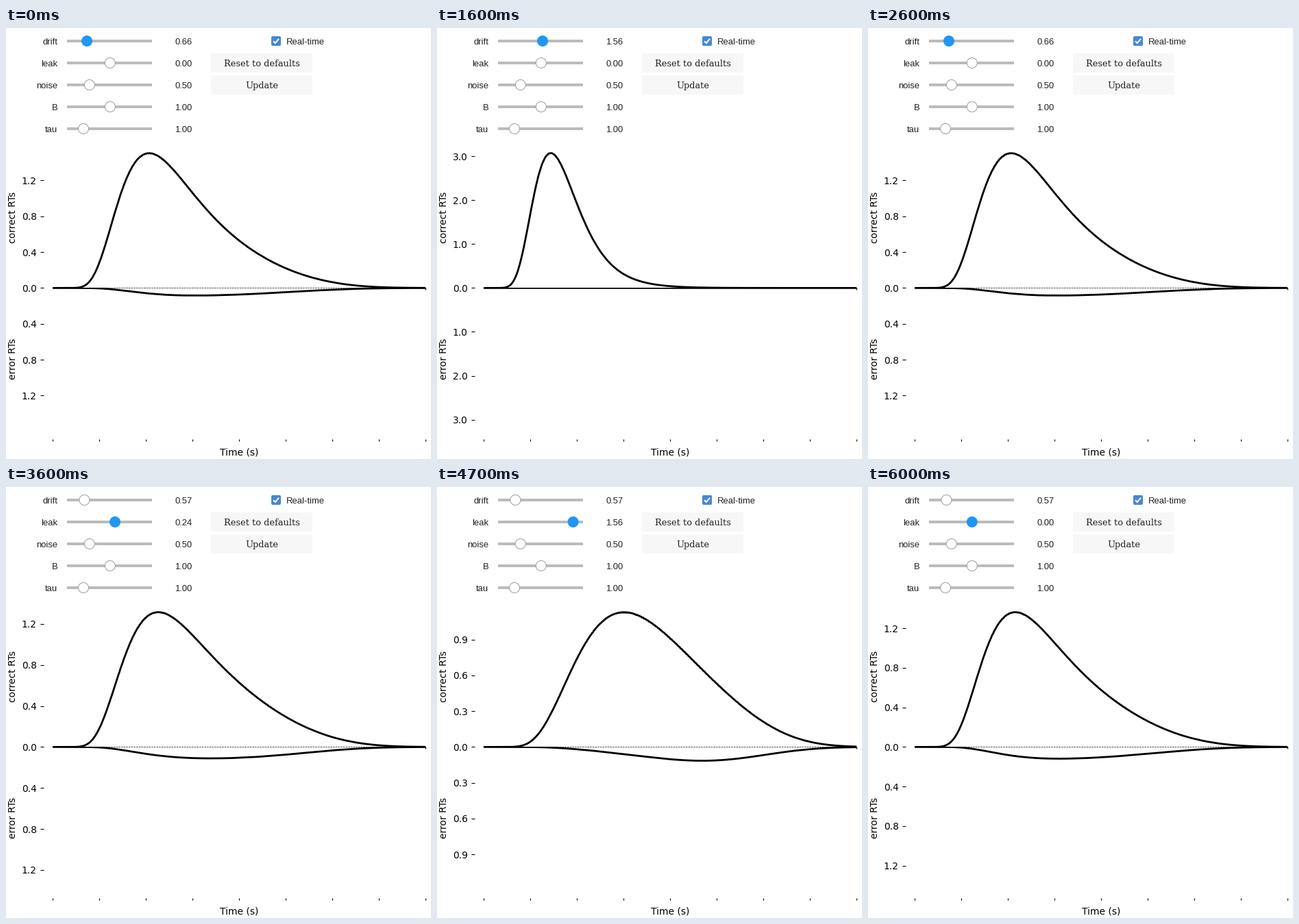
Recreate the animation shown at these times as a matplotlib script. Size 620x629 px, loop 6700 ms.

```python
import numpy as np
import matplotlib.pyplot as plt
from matplotlib.animation import FuncAnimation
from matplotlib.patches import Circle, FancyBboxPatch, Rectangle
from matplotlib.ticker import MaxNLocator

W, H, DPI = 620, 629, 100
PX = 72 / DPI  # points per pixel
FRAMES, STEP_MS = 67, 100

# Drift-diffusion model with an exponentially collapsing bound
DX = DT = 0.005
NOISE, BOUND, TAU, T_END = 0.5, 1.0, 1.0, 2.0

# Plot geometry in pixels, y pointing down
LEFT, WIDTH, ZERO, PEAK = 68.4, 544, 379.4, 196.8
HALF = 1.05 * PEAK
OFFSET = 13.9

BLUE = "#2196f3"
INK = "#212121"


def solve_tridiag(low, diag, up, rhs):
    """Thomas algorithm, run for many parameter sets at once."""
    n = len(rhs)
    c, d = np.empty_like(rhs), np.empty_like(rhs)
    c[0], d[0] = up[0] / diag, rhs[0] / diag
    for j in range(1, n):
        m = 1 / (diag - low[j] * c[j - 1])
        c[j] = up[j] * m
        d[j] = (rhs[j] - low[j] * d[j - 1]) * m
    for j in range(n - 2, -1, -1):
        d[j] -= c[j] * d[j + 1]
    return d


def response_times(drift, leak):
    """Densities of correct and error responses, one column per setting."""
    half = round(BOUND / DX)
    n = 2 * half + 1
    x = np.linspace(-BOUND, BOUND, n)[:, None]
    adv = 0.5 * DT / DX * (drift - leak * x)
    dif = 0.5 * DT * NOISE ** 2 / DX ** 2
    low = np.vstack([0 * adv[:1], -adv[:-1] - dif])
    up = np.vstack([adv[1:] - dif, 0 * adv[:1]])

    p = np.zeros((n, len(drift)))
    p[half] = 1
    steps = round(T_END / DT)
    good = np.zeros((steps + 1, len(drift)))
    bad = np.zeros_like(good)
    for i in range(steps):
        shift = BOUND * (1 - np.exp(-i * DT / TAU)) / DX
        outer = int(shift)
        frac = shift - outer
        new = np.zeros_like(p)
        # the bound lies between two grids: blend their solutions
        for k, w in ((outer, 1 - frac), (outer + 1, frac)):
            if w == 0:
                continue
            a, b = k, n - k
            q = solve_tridiag(low[a:b], 1 + 2 * dif, up[a:b], p[a:b])
            new[a:b] += w * q
            good[i + 1] += w * (p[b:].sum(0) + (dif + adv[b - 1]) * q[-1])
            bad[i + 1] += w * (p[:a].sum(0) + (dif - adv[a]) * q[0])
        p = new
    return good / DT, bad / DT


def state(i):
    """Drift, leak, active slider row and curve column at a given frame."""
    if i < 34:
        k = max(0, min(i, 26 - i))
        return 0.66 + 0.09 * k, 0.0, 0, k
    j = i - 34
    k = max(0, min(j, 26 - j))
    return 0.57, 0.12 * k, 1, 14 + k


ramp = np.arange(14)
drifts = np.r_[0.66 + 0.09 * ramp, np.full(14, 0.57)]
leaks = np.r_[np.zeros(14), 0.12 * ramp]
correct, error = response_times(drifts, leaks)
times_px = LEFT + WIDTH * np.linspace(0, 1, len(correct))
locator = MaxNLocator(8)

fig = plt.figure(figsize=(W / DPI, H / DPI), dpi=DPI, facecolor="white")
ax = fig.add_axes([0, 0, 1, 1])
ax.set_xlim(0, W)
ax.set_ylim(H, 0)
ax.axis("off")


def ui_text(x, y, s, family="Liberation Sans", **kw):
    return ax.text(x, y, s, family=family, size=13 * PX, color=INK, **kw)


def segment(x, y, lw, **kw):
    return ax.plot(x, y, color="black", lw=lw, **kw)[0]


def build_panel():
    knobs, readouts = [], []
    rows = (("drift", 118, 0.66), ("leak", 151.8, 0), ("noise", 121.8, NOISE),
            ("B", 151.8, BOUND), ("tau", 113, TAU))
    for r, (name, x, value) in enumerate(rows):
        y = 19 + 32 * r
        ui_text(75, y + 5, name, ha="right")
        ax.add_patch(Rectangle((89, y - 2), 124, 4, fc="#bbbbbb", lw=0))
        knobs.append(ax.add_patch(Circle((x, y), 7.5, lw=PX, zorder=3)))
        readouts.append(ui_text(246.3, y + 5, f"{value:.2f}"))

    ax.add_patch(FancyBboxPatch((389, 14), 10, 10, fc="#4787d8", lw=0,
                                boxstyle="round,pad=2,rounding_size=2"))
    ax.plot([390, 392.8, 398], [19.3, 22, 15.8], color="white", lw=2 * PX,
            solid_capstyle="butt", solid_joinstyle="miter")
    ui_text(408.5, 24, "Real-time")
    for y, label in ((37, "Reset to defaults"), (69, "Update")):
        ax.add_patch(Rectangle((299, y), 148, 28, fc="#f7f7f7", lw=0))
        ui_text(373, y + 18.8, label, family="DejaVu Serif", ha="center")
    return knobs, readouts


knobs, readouts = build_panel()
live = []


def draw_plot(col):
    good, bad = correct[:, col], error[:, col]
    top = max(good.max(), bad.max())
    lim, scale = 1.05 * top, PEAK / top
    ticks = [v for v in locator.tick_values(-lim, lim) if abs(v) <= lim]

    # a tick label above the axes pushes the whole plot down
    zero = ZERO + round(max(0, 5.5 - (lim - max(ticks)) * scale))
    base = zero + HALF + OFFSET

    live.append(segment([LEFT, LEFT + WIDTH], [zero] * 2, 0.5, ls="--"))
    for pdf, sign in ((good, -1), (bad, 1)):
        curve = segment(times_px, zero + sign * pdf * scale, 2, zorder=3)
        bottom = zero if sign < 0 else zero + HALF
        curve.set_clip_path(Rectangle((LEFT, bottom), WIDTH, -HALF,
                                      transform=ax.transData))
        live.append(curve)

    edge = LEFT - OFFSET
    for v in ticks:
        y = zero - v * scale
        live.append(segment([edge - 4.9, edge], [y, y], 0.8,
                            solid_capstyle="butt"))
        live.append(ax.text(edge - 9.7, y, f"{abs(v):.1f}", size=10,
                            ha="right", va="center_baseline"))
    for x in LEFT + np.linspace(0, WIDTH, 9):
        live.append(segment([x, x], [base, base + 2.8], 0.8,
                            solid_capstyle="butt"))
    x = LEFT + WIDTH
    live.append(segment([x, x], [zero, zero + 2.8], 0.8,
                        solid_capstyle="butt"))

    for label, y in (("correct RTs", zero - HALF / 2),
                     ("error RTs", zero + HALF / 2)):
        live.append(ax.text(13.8, y, label, size=10, rotation=90, ha="center",
                            va="baseline", rotation_mode="anchor"))
    live.append(ax.text(LEFT + WIDTH / 2, base + 23.9, "Time (s)", size=10,
                        ha="center"))


def update(i):
    drift, leak, active, col = state(i)
    knobs[0].center = (91.6 + 40 * drift, 19)
    knobs[1].center = (151.8 + 30 * leak, 51)
    readouts[0].set_text(f"{drift:.2f}")
    readouts[1].set_text(f"{leak:.2f}")
    for r, knob in enumerate(knobs):
        knob.set_facecolor(BLUE if r == active else "white")
        knob.set_edgecolor(BLUE if r == active else "#9e9e9e")

    for artist in live:
        artist.remove()
    live.clear()
    draw_plot(col)
    return []


anim = FuncAnimation(fig, update, frames=FRAMES, interval=STEP_MS,
                     init_func=lambda: update(0), repeat=True, repeat_delay=0)
plt.show()
```
